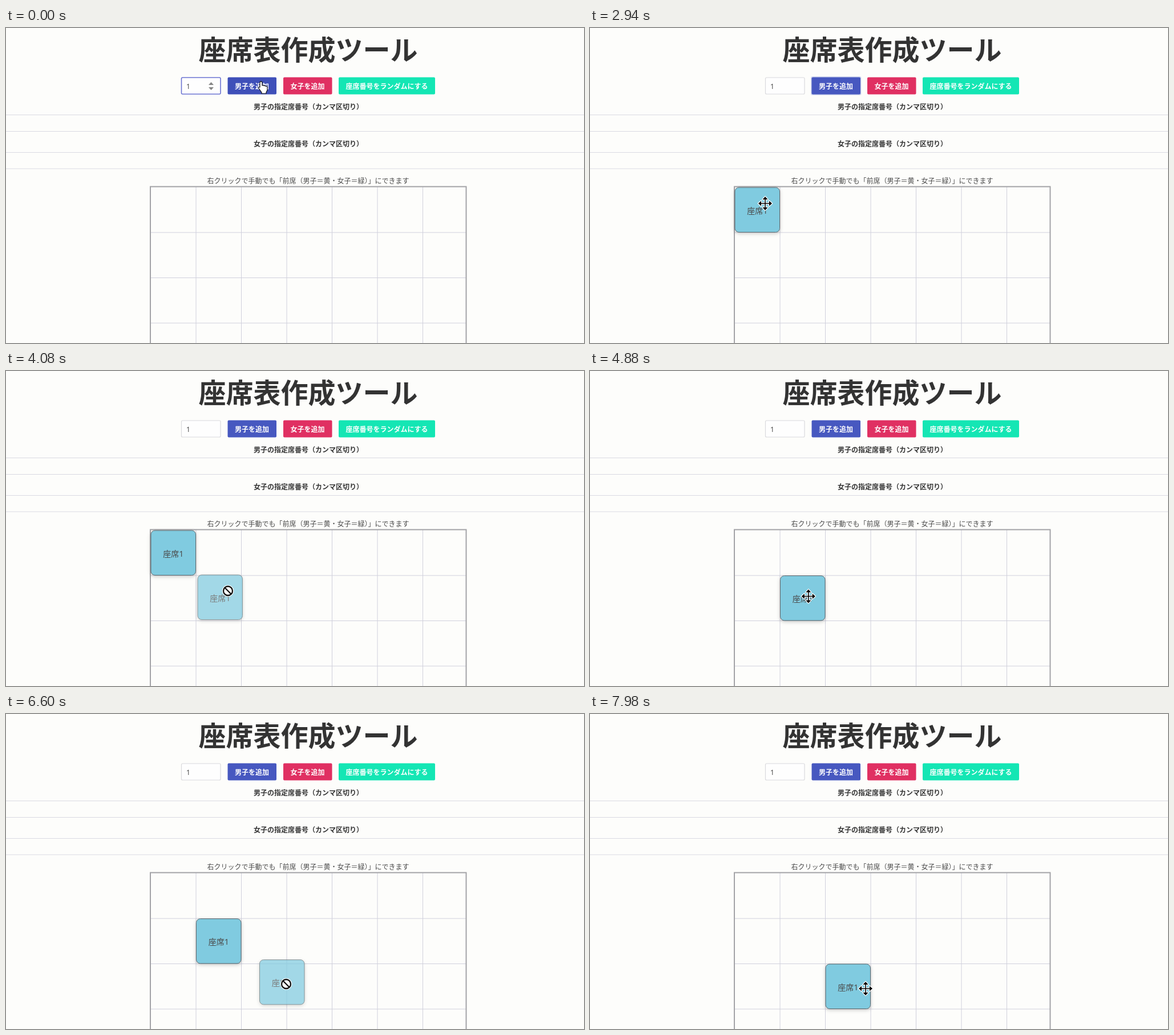
An HTML page that plays this animation: 1013x553 px, repeating every 8000 ms.

```html
<!DOCTYPE html>
<html lang="ja">
<head>
<meta charset="utf-8">
<style>
html, body { margin: 0; width: 100%; height: 100%; overflow: hidden; background: #fdfdfb; }
svg { display: block; width: 1013px; height: 553px; }
text { font: 12px "Noto Sans", "Noto Sans CJK JP", "Noto Sans CJK", sans-serif; fill: #4a4a4a;
  text-anchor: middle; text-spacing-trim: space-all; }
.bold { font-weight: 700; fill: #363636; }
.title { font-size: 48px; font-weight: 700; fill: #333; }
.button { font-weight: 600; fill: #fff; }
.seat text { font-size: 14px; }
.seat { filter: drop-shadow(0 2px 3px #0003); }
</style>
</head>
<body>
<svg viewBox="0 0 1013 553">
  <text class="title" x="529.5" y="56">座席表作成ツール</text>

  <rect id="number" x="307.5" y="87" width="68.5" height="29" rx="2" fill="#fefefe"/>
  <text x="319.5" y="106.5">1</text>
  <path id="spinner" d="M355 100l4.5-5 4.5 5zM355 104l4.5 5 4.5-5z" fill="#858585"/>

  <rect id="ring" x="387" y="85" width="88.500" height="33" rx="3" fill="#485fc7" opacity=".25"/>
  <rect id="add" x="388.500" y="86.500" width="85.500" height="30" rx="2"/>
  <rect x="486" y="86.500" width="85.500" height="30" rx="2" fill="#e03062"/>
  <rect x="583" y="86.500" width="169" height="30" rx="2" fill="#14e6b4"/>
  <text class="button" x="431" y="106.500">男子を追加</text>
  <text class="button" x="528.500" y="106.500">女子を追加</text>
  <text class="button" x="667.500" y="106.500">座席番号をランダムにする</text>

  <text class="bold" x="530" y="142.500">男子の指定席番号（カンマ区切り）</text>
  <text class="bold" x="530" y="208">女子の指定席番号（カンマ区切り）</text>
  <path d="M0 152.500H1013M0 181.500H1013M0 218.500H1013M0 247H1013" stroke="#dadae2"/>

  <text x="529.500" y="273">右クリックで手動でも「前席（男子＝黄・女子＝緑）<tspan dx="-6">」</tspan>にできます</text>
  <path id="grid" stroke="#d0d0dc"/>
  <rect x="253" y="278.500" width="553.500" height="320" fill="none" stroke="#a3a3a7" stroke-width="2"/>

  <defs>
    <g id="seat" class="seat">
      <rect x=".5" y=".5" width="78.500" height="78.500" rx="7" fill="#80cbe0" stroke="#5b6b70"/>
      <text x="39.800" y="46">座席1</text>
    </g>
  </defs>
  <use id="tile" href="#seat"/>
  <use id="ghost" href="#seat" opacity=".72"/>

  <g id="cursors" stroke-linejoin="round">
    <path id="hand" fill="#fff" stroke="#111" stroke-width="1.200"
      d="M-4 -8q2-2 4 0v6q2-1.500 3 .5q2-1 3 .7q2.500-.7 3 1.800v5l-2 4v2h-8v-2l-5-7q-1-3 2-2z"/>
    <path id="arrow" fill="#fff" stroke="#111" stroke-width="1.200"
      d="M0 0V19.500L4.500 15.500 8.500 24.500 12 23 8 14.500H14Z"/>
    <path id="move" stroke="#fff" stroke-width="2.400" paint-order="stroke"
      d="M0-12l4.500 5h-3.700v6.200h6.200v-3.700l5 4.500-5 4.500v-3.700h-6.200v6.200h3.700l-4.500 5-4.500-5h3.700v-6.200h-6.200v3.700l-5-4.500 5-4.500v3.700h6.200v-6.200h-3.700z"/>
    <g id="noDrop" fill="none">
      <circle r="8" stroke="#fff" stroke-width="4.500"/>
      <circle r="8" fill="#fff" stroke="#111" stroke-width="2.300"/>
      <path d="M-5.700-5.700L5.700 5.700" stroke="#111" stroke-width="2.300"/>
    </g>
  </g>
</svg>
<script>
const LOOP = 8000, PITCH = 79.5, LEFT = 253.5, TOP = 279.5;
const $ = id => document.getElementById(id);
const show = (id, on) => $(id).style.display = on ? '' : 'none';
const place = (id, x, y) => $(id).setAttribute('transform', `translate(${x} ${y})`);

// Pointer stops: time, x, y
const path = [
  [0, 449, 103], [300, 449, 103], [840, 344, 364], [1040, 344, 364], [1540, 337, 354],
  [1640, 337, 354], [1960, 307, 308], [2960, 307, 308], [3640, 388, 385], [4080, 389, 386],
  [4400, 386, 388], [5320, 380, 402], [6180, 380, 402], [6570, 491, 474],
  [7060, 491, 474], [7820, 483, 482], [LOOP, 483, 482]
];
const drags = [{ from: 2960, to: 4400 }, { from: 6180, to: 7300 }];

function pointer(t) {
  const i = path.findIndex(p => p[0] > t);
  const [t0, x0, y0] = path[i - 1], [t1, x1, y1] = path[i];
  const k = (t - t0) / (t1 - t0), e = k * k * (3 - 2 * k);
  return [x0 + (x1 - x0) * e, y0 + (y1 - y0) * e];
}

let lines = '';
for (let i = 1; i < 7; i++) lines += `M${253.5 + i * PITCH} 279V553`;
for (let i = 1; i < 4; i++) lines += `M253 ${279.5 + i * PITCH}H807`;
$('grid').setAttribute('d', lines);

function draw(t) {
  const [x, y] = pointer(t);
  const focused = t < 100, seated = t >= 160;
  const cell = drags.filter(d => t >= d.to).length;
  const tx = LEFT + cell * PITCH, ty = TOP + cell * PITCH;
  const drag = drags.find(d => t > d.from && t < d.to);
  const inside = seated && x > tx && x < tx + 79 && y > ty && y < ty + 79;
  const overButton = y < 117;

  $('number').setAttribute('stroke', focused ? '#6c74d2' : '#dadadd');
  $('number').setAttribute('stroke-width', focused ? 1.6 : 1.2);
  $('add').setAttribute('fill', overButton ? '#3f50b9' : '#4758c0');
  show('spinner', focused);
  show('ring', !focused && t < 2960);

  show('tile', seated);
  place('tile', tx, ty);
  show('ghost', drag);
  if (drag) {
    const [gx, gy] = pointer(drag.from);
    place('ghost', tx + x - gx, ty + y - gy);
  }

  const kind = drag ? 'noDrop' : inside ? 'move' : overButton ? 'hand' : 'arrow';
  for (const id of ['hand', 'arrow', 'move', 'noDrop']) show(id, id === kind);
  place('cursors', x, y);
}

const start = performance.now();
function tick() {
  draw((performance.now() - start) % LOOP);
  requestAnimationFrame(tick);
}
tick();
</script>
</body>
</html>
```
